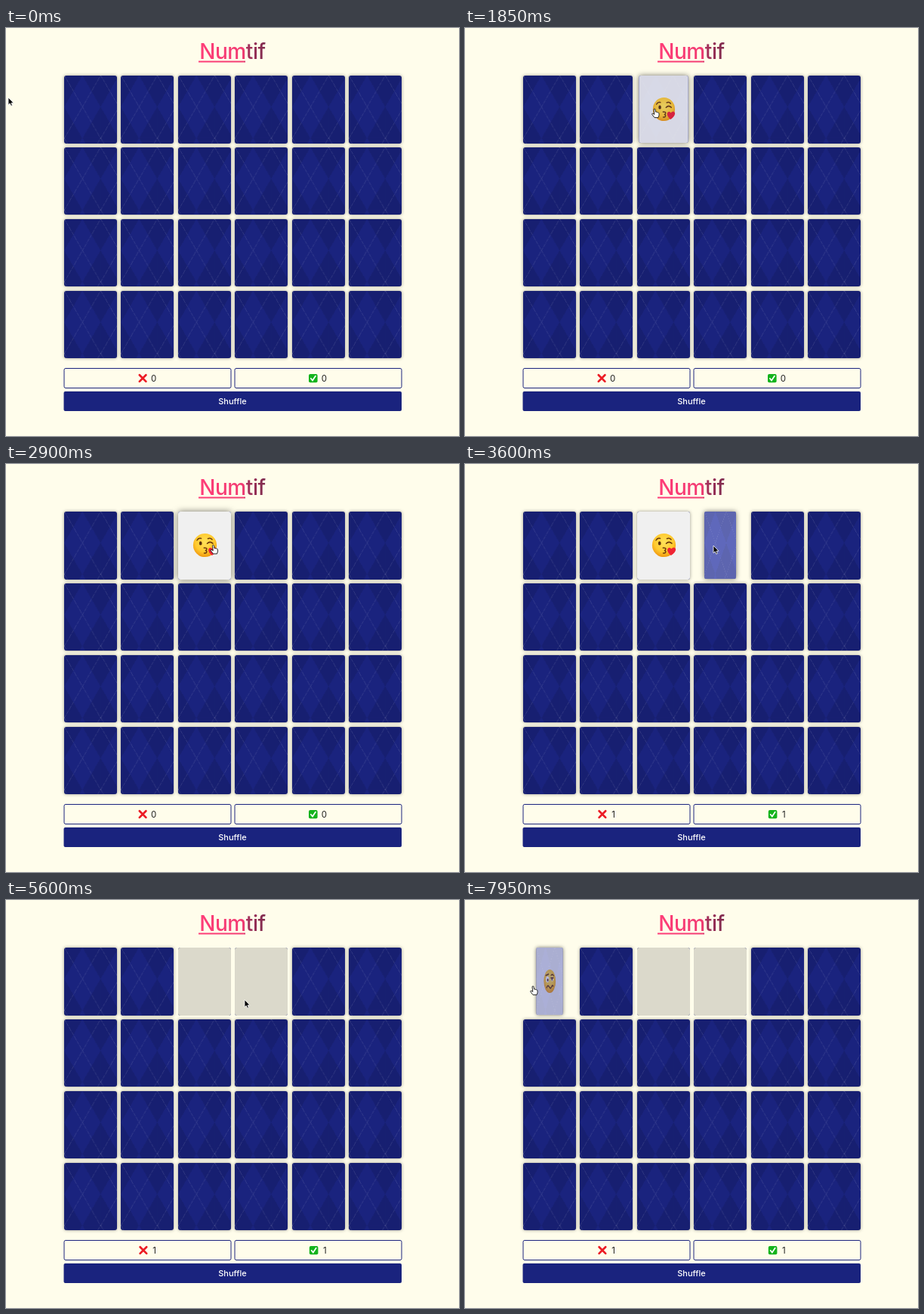
An HTML page that plays this animation: 600x540 px, repeating every 8000 ms.

```html
<!DOCTYPE html>
<html lang="en">
<head>
<meta charset="utf-8">
<title>Numtif</title>
<style>
html, body { margin: 0; width: 100%; height: 100%; overflow: hidden; background: #fffdeb; }
#stage { position: relative; width: 600px; height: 540px; overflow: hidden; }
#stage > svg { position: absolute; left: 0; top: 0; }
text { font-family: Inter, Roboto, sans-serif; }
.card {
  position: absolute; width: 70px; height: 89.4px; border-radius: 3px; overflow: hidden;
  background-size: 48.3px 82.8px;
  background-image:
    repeating-linear-gradient(120deg, #ffffff1a, #ffffff1a .7px, transparent .7px, transparent 41.4px),
    repeating-linear-gradient(60deg, #ffffff1a, #ffffff1a .7px, transparent .7px, transparent 41.4px),
    linear-gradient(60deg, #0000001a 25%, transparent 25%, transparent 75%, #0000001a 75%),
    linear-gradient(120deg, #0000001a 25%, transparent 25%, transparent 75%, #0000001a 75%);
}
.face { position: absolute; inset: 0; }
.face svg { position: absolute; left: 19px; top: 28.2px; }
</style>
</head>
<body>
<div id="stage">
<svg width="600" height="540" viewBox="0 0 600 540">
  <defs>
    <linearGradient id="ink" gradientUnits="userSpaceOnUse" x1="255" y1="0" x2="345" y2="0">
      <stop offset="0" stop-color="#ff3d78"/>
      <stop offset=".66" stop-color="#f23b72"/>
      <stop offset=".72" stop-color="#a5325c"/>
      <stop offset="1" stop-color="#7c2a4c"/>
    </linearGradient>
    <radialGradient id="skin" cx=".5" cy=".38" r=".62">
      <stop offset="0" stop-color="#ffe35a"/>
      <stop offset=".65" stop-color="#ffc92e"/>
      <stop offset="1" stop-color="#f0980f"/>
    </radialGradient>
  </defs>
  <text x="300" y="40.5" font-size="28" letter-spacing="-.4" font-weight="500" text-anchor="middle" fill="url(#ink)">Numtif</text>
  <rect x="255" y="43.5" width="62" height="2" fill="url(#ink)"/>
  <g fill="none" stroke="#1a237e">
    <rect x="77" y="450.5" width="221" height="26" rx="2"/>
    <rect x="303" y="450.5" width="221" height="26" rx="2"/>
  </g>
  <rect x="76.5" y="481" width="447.5" height="26" rx="2" fill="#1a237e"/>
  <text x="300" y="498" font-size="11" font-weight="500" text-anchor="middle" fill="#fff">Shuffle</text>
  <g id="miss">
    <path d="M176.8 459.2L185.4 467.9M185.4 459.2L176.8 467.9" stroke="#ec1c24" stroke-width="2.7" stroke-linecap="round"/>
    <text x="195.7" y="467.6" font-size="11.5" text-anchor="middle" fill="#222">0</text>
  </g>
  <g id="hit">
    <rect x="401" y="458" width="11.6" height="11.2" rx="2" fill="#14b31c"/>
    <path d="M403.8 463.8L406 466.5 410 460.6" fill="none" stroke="#fff" stroke-width="1.7" stroke-linecap="round"/>
    <text x="421.5" y="467.6" font-size="11.5" text-anchor="middle" fill="#222">0</text>
  </g>
</svg>
<div id="cards"></div>
<svg width="600" height="540" viewBox="0 0 600 540">
  <path id="arrow" d="M0 0V9.8L2.2 7.8 3.7 11.2 5.4 10.5 4 7.2H7Z" fill="#000" stroke="#fff" stroke-width=".8"/>
  <path id="hand" d="M-1 1Q-1 0 0 0T1 1L1.6 4.2Q2.6 3.6 3.2 4.5 4.2 4 4.7 5 6 4.9 6 6.3V8.6L5 11.6H0L-3.2 7.4Q-3.6 6 -2.2 6.1L-.2 7.4Z" fill="#fff" stroke="#111" stroke-width=".9" stroke-linejoin="round"/>
</svg>
</div>
<script>
const LOOP = 8000, STEP = 50, FLIP = 500;
const $ = id => document.getElementById(id);
const clamp = v => Math.max(0, Math.min(1, v));
const mix = (a, b, k) => a + (b - a) * k;
const blend = (a, b, k) => `rgb(${a.map((v, i) => mix(v, b[i], k)).join()})`;

const NAVY = [26, 35, 126], BRIGHT = [34, 47, 164];
const PAPER = [240, 240, 240], EMPTY = [219, 217, 203];
const COUNT_AT = 3500, CLEAR_AT = 4850;

const emoji = body => `<svg width="33" height="33" viewBox="-16.5 -16.5 33 33" fill="none" stroke-linecap="round">
  <circle r="15.6" fill="url(#skin)"/>${body}</svg>`;
const kiss = emoji(`
  <g stroke="#6b3a0c" stroke-width="1.5">
    <path d="M-10.5 -6.5Q-8.5 -10 -5 -9M4 -8.8Q7.5 -10 9.5 -7.5M3 -2.2Q6.5 -6 10.5 -2.4"/>
    <path d="M-1.2 3.6Q3 3.3 2.4 5.4 2 6.7 .4 6.9 3 7.2 2.2 9.3 1.4 10.8 -1 10.4"/>
  </g>
  <ellipse cx="-5.8" cy="-2.6" rx="1.9" ry="2.6" fill="#5a300b"/>
  <path d="M9.4 13.6Q3.4 8.6 4.8 5 6.6 1.8 9.8 4.8 13 1.4 15.4 4.4 16.8 8.4 9.4 13.6Z" fill="#ef2434"/>`);
const woozy = emoji(`
  <circle cx="-6" cy="-2.4" r="4" fill="#fff"/><circle cx="6.4" cy="-3" r="3" fill="#fff"/>
  <circle cx="-5.2" cy="-1.6" r="1.9" fill="#5a300b"/><circle cx="6" cy="-2.4" r="1.6" fill="#5a300b"/>
  <g stroke="#6b3a0c" stroke-width="1.6">
    <path d="M-10.5 -7.6L-3 -9.4M3.2 -7.6Q7 -10.4 10.4 -7.2M2.8 -4.4H9.6"/>
    <path d="M-8 8.4Q-5 4 -1.6 7.4T4.4 7.6 9 6.4" stroke-width="2"/>
  </g>`);

// Card index -> moment it is turned over
const plays = {
  0: { at: 7755, face: woozy },
  2: { at: 1550, face: kiss, pair: true },
  3: { at: 3500, face: kiss, pair: true }
};

const cards = Array.from({ length: 24 }, (_, i) => {
  const el = document.createElement('div');
  const x = 76.5 + (i % 6) * 75.5, y = 63.3 + Math.floor(i / 6) * 94.8;
  const play = plays[i];
  el.className = 'card';
  el.style.left = x + 'px';
  el.style.top = y + 'px';
  el.innerHTML = `<div class="face">${play ? play.face : ''}</div>`;
  $('cards').append(el);
  return { el, x, y, play, face: el.firstChild, art: el.querySelector('svg') };
});

// Pointer tip: time, x, y
const path = [
  [0, 3, 92], [100, 3, 92], [800, 205, 104], [1000, 216, 104], [1450, 251, 107],
  [2700, 251, 107], [3250, 329, 108], [3900, 329, 108], [4350, 315, 132],
  [5200, 316, 132], [5900, 316, 132], [6800, 98, 117], [7200, 90, 114], [LOOP, 90, 114]
];

function pointer(t) {
  const n = path.findIndex(p => p[0] > t);
  if (n < 1) return path[0].slice(1);
  const [t0, x0, y0] = path[n - 1], [t1, x1, y1] = path[n];
  const k = (t - t0) / (t1 - t0), s = k * k * (3 - 2 * k);
  return [mix(x0, x1, s), mix(y0, y1, s)];
}

// cubic-bezier(.25, .1, .25, 1)
function ease(x) {
  if (x <= 0 || x >= 1) return clamp(x);
  let lo = 0, hi = 1, u = .5;
  for (let i = 0; i < 20; i++) {
    u = (lo + hi) / 2;
    if (.75 * u * (1 - u) + u ** 3 < x) lo = u; else hi = u;
  }
  return .3 * u * (1 - u) ** 2 + 3 * u * u * (1 - u) + u ** 3;
}

const turn = (c, t) => c.play ? ease((t - c.play.at) / FLIP) : 0;
const cleared = (c, t) => c.play && c.play.pair ? ease((t - CLEAR_AT) / 350) : 0;

function over(c, t) {
  const [x, y] = pointer(t);
  return x >= c.x && x <= c.x + 70 && y >= c.y && y <= c.y + 89.4 && !cleared(c, t);
}

// Trailing average gives a 200 ms hover transition
function hover(c, t) {
  let n = 0;
  for (let k = 0; k < 10; k++) n += over(c, t - k * 20);
  return n / 10;
}

function drawCard(c, t) {
  const p = turn(c, t), h = hover(c, t), gone = cleared(c, t), s = c.el.style;
  s.transform = `scaleX(${Math.abs(Math.cos(p * Math.PI))})`;
  s.backgroundColor = blend(NAVY, BRIGHT, h);
  s.boxShadow = `0 0 ${mix(4, 8, h)}px rgba(0,0,0,${mix(.4, .55, h) * (1 - gone)})`;
  c.face.style.opacity = p;
  c.face.style.backgroundColor = blend(PAPER, EMPTY, gone);
  if (c.art) c.art.style.opacity = p > .5 ? 1 - gone : 0;
}

function drawCount(id, n) {
  $(id).setAttribute('transform', `translate(${n * .8})`);
  $(id).querySelector('text').textContent = n;
}

function draw(t) {
  cards.forEach(c => drawCard(c, t));
  const n = +(t >= COUNT_AT);
  drawCount('miss', n);
  drawCount('hit', n);
  const [x, y] = pointer(t);
  const target = cards.find(c => over(c, t));
  const p = target ? turn(target, t) : 0;
  const hand = target && !(p > 0 && p < .5);
  for (const id of ['arrow', 'hand']) {
    $(id).setAttribute('transform', `translate(${x} ${y})`);
    $(id).style.display = (id === 'hand') === !!hand ? '' : 'none';
  }
}

const start = performance.now();
function tick() {
  const t = (performance.now() - start) % LOOP;
  draw(Math.floor(t / STEP) * STEP);
  requestAnimationFrame(tick);
}
tick();
</script>
</body>
</html>
```
